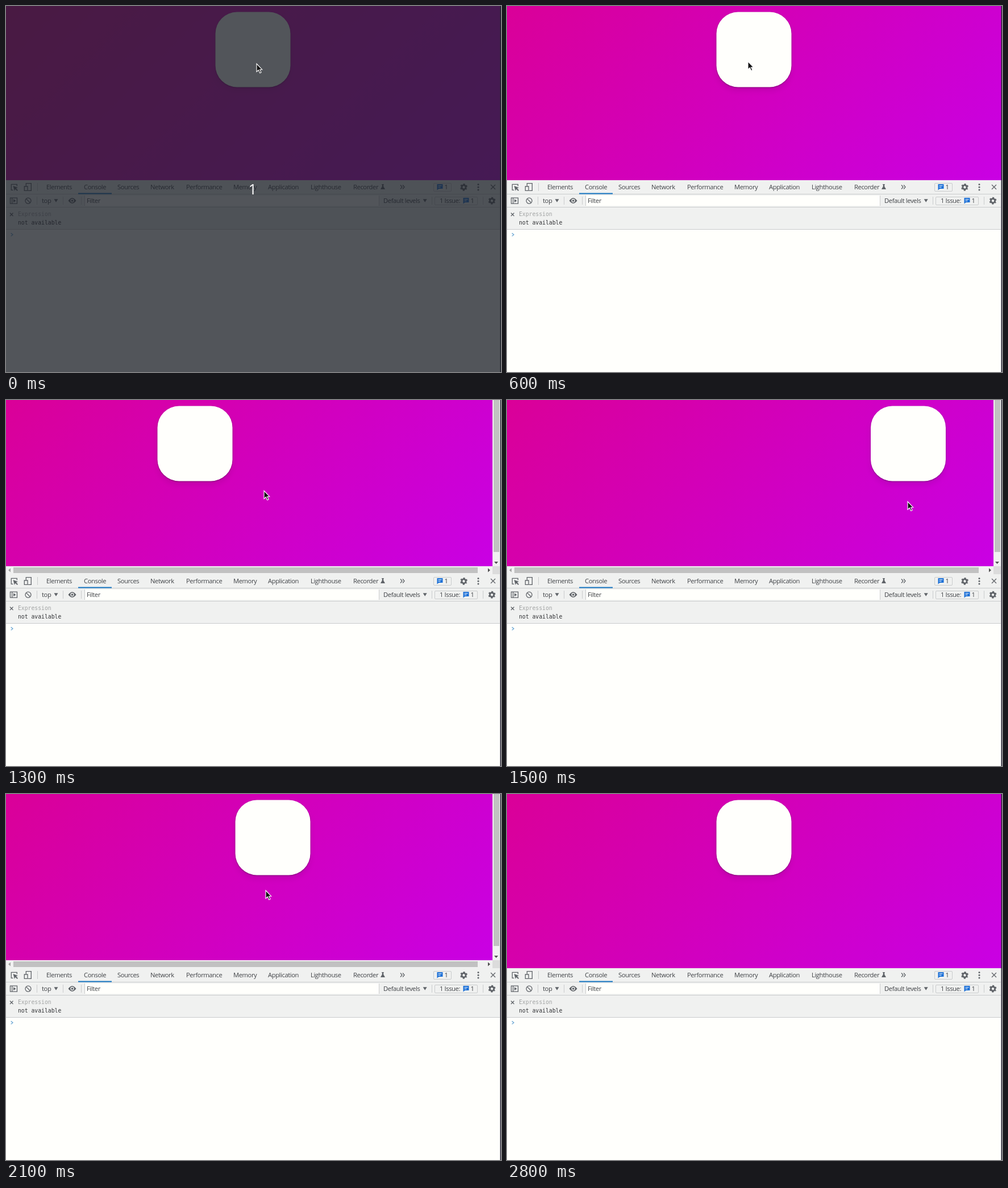
An HTML page for the animation above (3.5 s loop, 871 px wide and 643 px high).

```html
<!DOCTYPE html>
<html lang="en">
<head>
<meta charset="utf-8">
<title>Square following the pointer</title>
<style>
html, body { margin: 0; width: 100%; height: 100%; overflow: hidden; background: #fffffc; }
#stage { position: relative; width: 871px; height: 643px; overflow: hidden; }
#stage > * { position: absolute; left: 0; top: 0; }
#page { width: 870px; height: 306px; background: linear-gradient(135deg, #da0098, #c900e4); }
#page.scrolls { width: 856px; height: 292px; }
#square {
  fill: #fffffc;
  filter: drop-shadow(0 1px 1px rgba(0,0,0,.34)) drop-shadow(0 6px 5px rgba(0,0,0,.08));
}
#dim { width: 871px; height: 643px; background: rgba(30,34,42,.77); }
text { font: 11.2px "Open Sans", "Noto Sans", sans-serif; letter-spacing: -.4px; fill: #404347; }
.mono { font: 9.75px "DejaVu Sans Mono", monospace; letter-spacing: 0; fill: #303134; }
.count { font-size: 26px; fill: #fff; text-anchor: middle; letter-spacing: 0; }
.line { fill: none; stroke: #5f6368; stroke-width: 1.3; }
.rule { fill: none; stroke: #cacccd; }
.solid { fill: #5f6368; }
</style>
</head>
<body>
<div id="stage">
  <div id="page"></div>
  <svg width="871" height="643">
    <defs>
      <g id="gear" transform="rotate(30)">
        <circle r="3.6" fill="none" stroke="#5f6368" stroke-width="2.8"/>
        <circle r="5.4" fill="none" stroke="#5f6368" stroke-width="2" stroke-dasharray="2.827" stroke-dashoffset="1.4"/>
      </g>
      <g id="bubble">
        <path d="M0 0H10V8H3L0 10.5Z" fill="#1a6fd6"/>
        <path d="M2 2.7H8M2 5.3H6" stroke="#fff"/>
      </g>
      <path id="down" class="solid" d="M-3.5 -2.7H3.5L0 2.7Z"/>
    </defs>

    <rect id="square" y="10.5" width="132" height="132" rx="38"/>

    <g id="bars">
      <path fill="#f1f1f1" d="M856 0H869V292H856ZM0 292H856V306H0Z"/>
      <path fill="#dcdcdc" d="M856 292H869V306H856Z"/>
      <path fill="#c1c1c1" d="M858 0H868V267H858ZM13 294H830V304H13Z"/>
      <path fill="#505050" d="M859 284H866L862.5 288ZM848 295.5V302.5L852 299Z"/>
      <path fill="#a3a3a3" d="M8 295.5V302.5L4 299Z"/>
    </g>

    <path fill="#fffffc" d="M0 306H869V643H0Z"/>
    <path fill="#f0f1f0" d="M0 306H869V392H0Z"/>
    <path fill="#fffffc" d="M139 333H657V351H139Z"/>
    <path class="rule" d="M0 330.5H869M0 353.5H869M0 392.5H869M55.5 311V325M54.5 335V349M100.5 335V349M132.5 335V349M138.5 333V351M656.5 333V351M749.5 335V349M839.5 335V349"/>
    <path fill="#1a78c4" d="M127 328.5H186V330.5H127Z"/>
    <rect class="rule" x="752.5" y="311.5" width="31" height="14" rx="1.5"/>
    <rect class="rule" x="754.5" y="335.5" width="75" height="14" rx="1.5"/>

    <path class="line" d="M12.5 323.3H9.3V313.3H19.3V316.5"/>
    <path class="solid" d="M12.5 316L21 319.2L17.8 320.4L21 323.6L19.6 325L16.4 321.8L15 325Z"/>
    <path class="line" d="M35.3 316V311.7H44.3V324.3H39M32.3 317H38V324.4H32.3Z"/>
    <path class="solid" d="M661 313H665V314H664.2V317L667 322H659L661.8 317V314H661Z"/>
    <path class="line" d="M694 314.5L697 318L694 321.5M698 314.5L701 318L698 321.5"/>
    <path class="line" d="M853 314L861 322M861 314L853 322"/>
    <g class="solid"><circle cx="831" cy="313.5" r="1.5"/><circle cx="831" cy="318.2" r="1.5"/><circle cx="831" cy="323" r="1.5"/></g>
    <path class="line" d="M7.5 337.2H19.5V347.2H7.5ZM10.7 337V347"/>
    <path class="solid" d="M13 339.3L17.5 342.2L13 345.1Z"/>
    <path class="line" d="M35.4 338.6L42.6 345.8"/>
    <circle class="line" cx="39" cy="342.2" r="5"/>
    <path class="solid" d="M109.5 342Q116.5 332.5 123.5 342Q116.5 351.5 109.5 342Z"/>
    <circle cx="116.5" cy="342" r="2.5" fill="#5f6368" stroke="#f0f1f0" stroke-width="1.3"/>
    <path class="line" d="M7 363.5L12.5 369M12.5 363.5L7 369"/>
    <path d="M8.7 399L12 401.7L8.7 404.4" fill="none" stroke="#5fa0d0" stroke-width="1.2"/>
    <use href="#down" x="88" y="342"/><use href="#down" x="737.2" y="342"/>
    <use href="#gear" transform="translate(805.5 318.3)"/><use href="#gear" transform="translate(855 342.2)"/>
    <use href="#bubble" x="758.5" y="313"/><use href="#bubble" x="804.5" y="337"/>
    <g id="labels"></g>
    <text class="mono" x="21" y="368.5" style="fill:#a2a4a4">Expression</text>
    <text class="mono" x="21" y="384">not available</text>
    <path fill="#2b2838" d="M869.5 0H871V643H869.5Z"/>
  </svg>
  <div id="dim"></div>
  <svg width="871" height="643">
    <text id="count" class="count" x="434" y="331">1</text>
    <path id="pointer" d="M0 .5V14.5L3.3 11.5L5.7 16.7L8 15.7L5.7 10.7H9.7Z" fill="#111" stroke="#fff" stroke-width="1.1"/>
  </svg>
</div>
<script>
const $ = id => document.getElementById(id);
const LOOP = 3500, STEP = 100, REST = 368.5;

const tabs = [["Elements", 71], ["Console", 137], ["Sources", 196], ["Network", 254],
  ["Performance", 317], ["Memory", 400], ["Application", 461], ["Lighthouse", 536],
  ["Recorder", 611], ["1", 771.5]];
const tools = [["top", 63], ["Filter", 142], ["Default levels", 664], ["1 Issue:", 763], ["1", 817.5]];
const label = y => ([text, x]) => `<text x="${x}" y="${y}">${text}</text>`;
$("labels").innerHTML = tabs.map(label(321.7)).join("") + tools.map(label(346)).join("");

// Keys are [step, value, ...]; values between keys are linear.
const squareKeys = [[7, REST], [8, 364], [10, 295.5], [11, 235], [12, 222], [13, 266.5],
  [15, 640], [17, 57.5], [19, 590], [20, 500], [21, 403.5], [22, 382], [24, 371], [26, REST]];
const pointerKeys = [[3, 441, 101], [4, 354, 138], [5, 385, 118], [6, 424, 97], [7, 424, 97],
  [10, 16, 101], [13, 454, 159], [15, 705, 178], [17, 113, 143], [19, 640, 178],
  [21, 457, 169], [23, 440, 178], [25, 440, 178]];

function at(keys, step) {
  const next = keys.findIndex(key => key[0] >= step);
  if (next < 0) return keys.at(-1).slice(1);
  if (next === 0) return keys[0].slice(1);
  const a = keys[next - 1], b = keys[next], k = (step - a[0]) / (b[0] - a[0]);
  return a.slice(1).map((v, i) => v + (b[i + 1] - v) * k);
}

const show = (id, on) => { $(id).style.display = on ? "" : "none"; };

function draw(now) {
  const step = Math.floor(now % LOOP / STEP);
  const scrolls = step >= 11 && step < 26;
  $("page").classList.toggle("scrolls", scrolls);
  show("bars", scrolls);
  show("dim", step === 0);
  show("count", step === 0);
  show("pointer", step < 26);
  $("square").setAttribute("x", at(squareKeys, step)[0]);
  $("pointer").setAttribute("transform", `translate(${at(pointerKeys, step)})`);
}

const start = performance.now();
function tick() {
  draw(performance.now() - start);
  requestAnimationFrame(tick);
}
tick();
</script>
</body>
</html>
```
